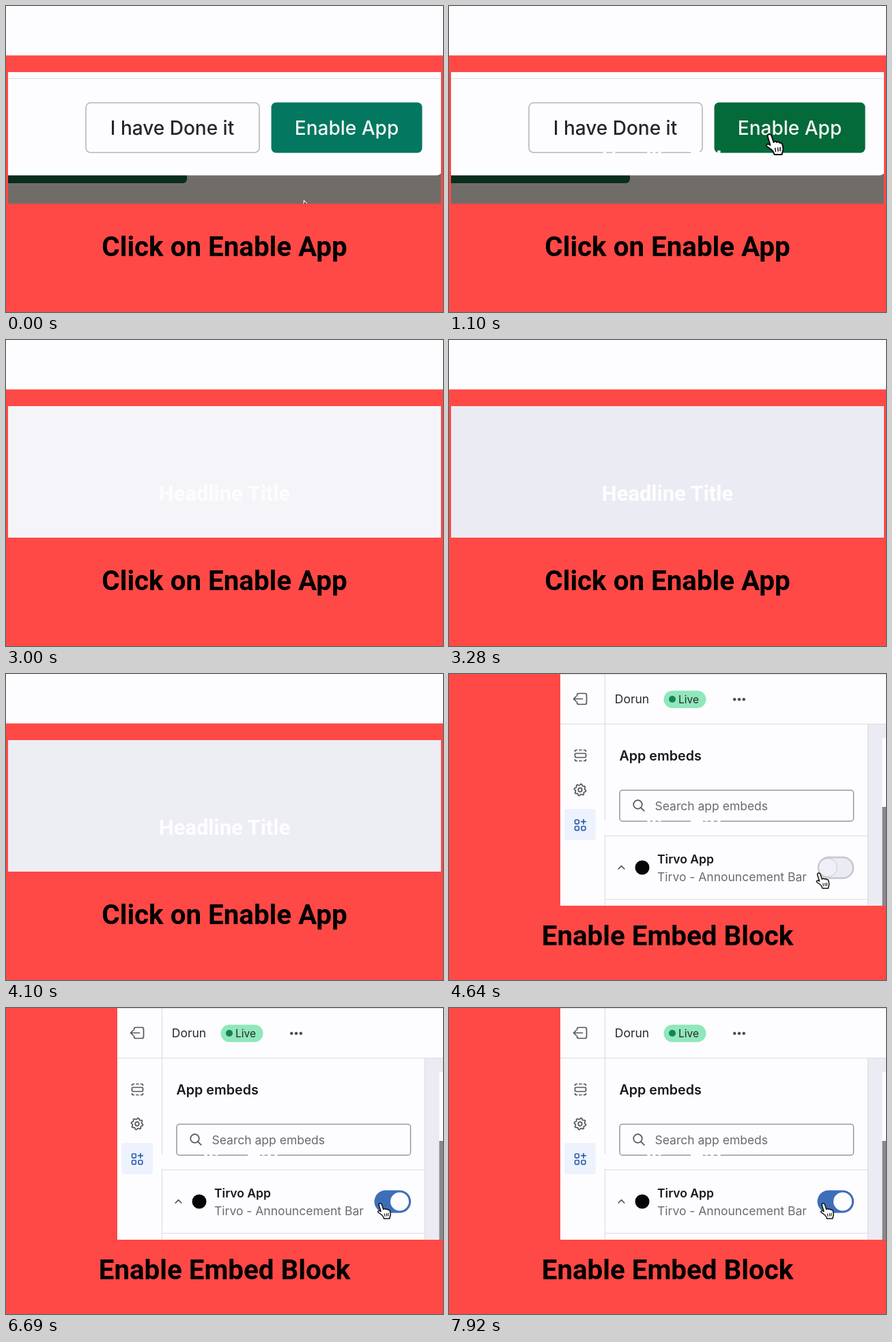
Write an HTML page that moves like this. It is 640x449 px and loops after 8 s.

```html
<!DOCTYPE html>
<html lang="en">
<head>
<meta charset="utf-8">
<title>Enable the app</title>
<style>
  html, body { margin: 0; width: 100%; height: 100%; overflow: hidden; background: #ff4946; }
  svg { display: block; width: 640px; height: 449px; }
  text { font-family: Inter, "Open Sans", sans-serif; }
  .caption, .headline { font-family: Roboto, Arial, sans-serif; font-weight: 700; text-anchor: middle; }
  .caption { font-size: 40.3px; fill: #000; }
  .headline { font-size: 30.9px; fill: #fdfdff; }
  .button { font-size: 28px; font-weight: 500; text-anchor: middle; }
  .ui { font-size: 17.5px; fill: #26282b; }
  .soft { fill: #686a72; }
  .strong { font-weight: 600; fill: #17181b; }
  .rule { stroke: #dcdce3; stroke-width: 1.2; fill: none; }
  .icon { stroke: #53555c; stroke-width: 1.7; fill: none; stroke-linecap: round; stroke-linejoin: round; }
  .hand { fill: #fff; stroke: #111; stroke-width: 2; stroke-linejoin: round; }
</style>
</head>
<body>
<svg viewBox="0 0 640 449">
  <defs>
    <clipPath id="panelClip"><rect x="3" y="97" width="634" height="193"/></clipPath>
    <clipPath id="editorClip"><rect x="163" width="477" height="340"/></clipPath>
    <g id="hand">
      <path class="hand" d="M-2 3Q-2 0 1 0Q3 0 4 3L7 12Q9 9 11.5 12Q14 10 16 13Q19 12 20 16L21 22Q20 26 19 30H8Q7 26 4 23L-3 18Q-5 15 -1 14.500L2 16Z"/>
      <path d="M9 20l1 6M13 19.500l.6 6M16.500 19v6" stroke="#111" stroke-width="1.500" fill="none"/>
    </g>
    <path id="arrow" d="M0 0V26L6 20.500L10.500 30.500L14.500 28.500L10.500 19H17.500Z"
      fill="#080808" stroke="#fdfdff" stroke-width="2.400" paint-order="stroke"/>
  </defs>

  <rect width="640" height="449" fill="#ff4946"/>

  <g id="dialogScene">
    <rect width="640" height="72.500" fill="#fdfdff"/>
    <g clip-path="url(#panelClip)">
      <rect x="3" y="97" width="634" height="193" fill="#fdfdff"/>
      <g id="dialog">
        <rect x="3" y="240" width="634" height="50" fill="#706d69"/>
        <rect x="-9" y="240" width="274" height="20" rx="6" fill="#0b2d1c"/>
        <rect x="-20" y="80" width="660" height="168.500" rx="10" fill="#fdfdff"/>
        <path class="rule" d="M3 106.500H637"/>
        <rect x="117" y="142" width="254" height="73" rx="7" fill="#fdfdff" stroke="#b6b6b8" stroke-width="1.600"/>
        <rect id="enable" x="388.500" y="141.500" width="221" height="74" rx="7"/>
        <text class="button" x="243.500" y="189" fill="#25262a">I have Done it</text>
        <text class="button" x="499" y="189" fill="#f5f7f5">Enable App</text>
      </g>
      <use id="arrow1" href="#arrow"/>
      <rect id="tint" x="3" y="97" width="634" height="193" fill="#ebebf3"/>
      <text id="headline" class="headline" x="320" y="236">Headline Title</text>
      <use id="hand1" href="#hand"/>
    </g>
    <text class="caption" x="320" y="367">Click on Enable App</text>
  </g>

  <g id="editorScene">
    <g clip-path="url(#editorClip)">
      <rect x="163" width="477" height="340" fill="#fdfdff"/>
      <rect x="614" y="74" width="26" height="266" fill="#ebebf3"/>
      <rect x="634.500" y="94" width="6" height="101" fill="#fdfdff"/>
      <rect x="634.500" y="195" width="6" height="145" fill="#89878b"/>
      <path class="rule" d="M163 .5H640M163 73.500H640M228.500 0V340M613.500 74V340M228 237.500H614M228 330.500H614"/>

      <path class="icon" d="M187.500 32v-1q0-2.500 2.500-2.500h9q2.500 0 2.500 2.500v11q0 2.500-2.500 2.500h-9q-2.500 0-2.500-2.500v-1M195.500 36.500H183M186 33l-3.500 3.500 3.500 3.500"/>
      <path class="icon" d="M184.500 113.500v0q0-2 2-2h1M191 111.500h3M197.500 111.500h1q2 0 2 2v0M184.500 125.500v0q0 2 2 2h1M191 127.500h3M197.500 127.500h1q2 0 2-2v0"/>
      <rect class="icon" x="184.500" y="116.500" width="16" height="6" rx="1.500"/>
      <path id="gear" class="icon"/>
      <circle class="icon" cx="192" cy="170" r="2.800"/>
      <rect x="169" y="198" width="46" height="46" rx="4" fill="#edf2fc"/>
      <g class="icon" style="stroke:#2c5cae">
        <rect x="184.500" y="214" width="5.800" height="5.800" rx="1.500"/>
        <rect x="184.500" y="223.500" width="5.800" height="5.800" rx="1.500"/>
        <rect x="194" y="223.500" width="5.800" height="5.800" rx="1.500"/>
        <path d="M197 213.500v6.500M193.700 216.700h6.500"/>
      </g>

      <text class="ui" x="242.800" y="42.500">Dorun</text>
      <rect x="314.500" y="24.500" width="62" height="25.500" rx="12.700" fill="#90e7b9"/>
      <circle cx="327" cy="37" r="5" fill="#17805f"/>
      <text class="ui" x="336" y="43" style="font-size:15.500px">Live</text>
      <g fill="#4a4c52">
        <circle cx="418.200" cy="37.300" r="2.200"/><circle cx="425" cy="37.300" r="2.200"/><circle cx="431.800" cy="37.300" r="2.200"/>
      </g>

      <text class="ui strong" x="249.500" y="126.500" style="font-size:19.700px">App embeds</text>
      <rect x="250" y="170.500" width="342.500" height="45.500" rx="4" fill="none" stroke="#97989e" stroke-width="1.500"/>
      <circle class="icon" cx="276.500" cy="191.500" r="6.300"/>
      <path class="icon" d="M281.300 196.300l4.500 4.500"/>
      <text class="ui soft" x="301.500" y="200">Search app embeds</text>

      <path class="icon" d="M248.200 286l4.300-4.300 4.300 4.300"/>
      <circle cx="283" cy="284" r="10.500" fill="#050505"/>
      <text class="ui strong" x="305" y="278">Tirvo App</text>
      <text class="ui soft" x="305" y="303.500">Tirvo - Announcement Bar</text>

      <rect x="541" y="269" width="51" height="30.500" rx="15.200" fill="#ebebf4" stroke="#c7c6cf" stroke-width="2.500"/>
      <rect id="on" x="539.500" y="267.500" width="53.500" height="33" rx="16.500" fill="#3d6fb9"/>
      <circle id="knob" cy="284" r="13.500"/>
      <text class="headline" x="320" y="236">Headline Title</text>
      <use id="hand2" href="#hand"/>
    </g>
    <text class="caption" x="320" y="398">Enable Embed Block</text>
  </g>
</svg>
<script>
const LOOP = 8000, CUT = 4380;
const $ = id => document.getElementById(id);
const set = (id, name, value) => $(id).setAttribute(name, value);
const show = (id, on) => set(id, "visibility", on ? "inherit" : "hidden");
const place = (id, [x, y], k = 1) => set(id, "transform", `translate(${x} ${y}) scale(${k})`);

// Each track is a list of [time, ...values].
const tracks = {
  pointer: [[0, 437, 287], [130, 437, 286], [950, 468.500, 188]],
  headline: [[130, 0], [540, 1]],
  dialog: [[1360, 1], [1770, 0]],
  tint: [[2740, 0], [3280, 1], [4099, 1], [4100, .9]],
  hand: [[4380, 533, 297], [4640, 541, 292], [5050, 547.500, 287], [5460, 547.500, 286.500]],
  toggle: [[6150, 0], [6430, 1]]
};

const smooth = p => p * p * (3 - 2 * p);
function at(name, t) {
  const track = tracks[name];
  if (t <= track[0][0]) return track[0].slice(1);
  for (let i = 1; i < track.length; i++) {
    const [a, ...from] = track[i - 1], [b, ...to] = track[i];
    if (t < b) {
      const p = smooth((t - a) / (b - a));
      return from.map((v, j) => v + (to[j] - v) * p);
    }
  }
  return track[track.length - 1].slice(1);
}

// The picture moves in steps, three to every 410 ms.
function step(t) {
  const r = t % 410;
  return t - r + (r < 130 ? 0 : r < 280 ? 130 : 280);
}

function gearPath() {
  const points = [];
  for (let i = 0; i < 32; i++) {
    const a = (i + .5) * Math.PI / 16, r = i % 4 < 2 ? 8.600 : 6.800;
    points.push((192 + r * Math.sin(a)).toFixed(2) + " " + (170 - r * Math.cos(a)).toFixed(2));
  }
  return "M" + points.join("L") + "Z";
}

function drawDialog(t) {
  const tip = at("pointer", t);
  const over = tip[1] < 215;
  const hand = over && t < 1920;
  place("arrow1", t < 1920 ? tip : [470, 185]);
  place("hand1", tip);
  show("arrow1", !hand && t < 2870);
  show("hand1", hand);
  set("enable", "fill", over ? "#046a3a" : "#047760");
  set("dialog", "opacity", at("dialog", t)[0]);
  set("tint", "opacity", at("tint", t)[0]);
  set("headline", "opacity", at("headline", t)[0]);
}

function drawEditor(t) {
  const [p] = at("toggle", t);
  set("on", "opacity", p);
  set("knob", "cx", 555 + 21.500 * p);
  set("knob", "fill", p > 0 ? "#fdfdff" : "#efeff7");
  set("knob", "stroke", p > 0 ? "none" : "#c9c8d1");
  place("hand2", at("hand", t), .75);
}

function draw(now) {
  const t = step(now % LOOP);
  const first = t < CUT;
  show("dialogScene", first);
  show("editorScene", !first);
  (first ? drawDialog : drawEditor)(t);
}

set("gear", "d", gearPath());
const start = performance.now();
function tick() {
  draw(performance.now() - start);
  requestAnimationFrame(tick);
}
tick();
</script>
</body>
</html>
```
